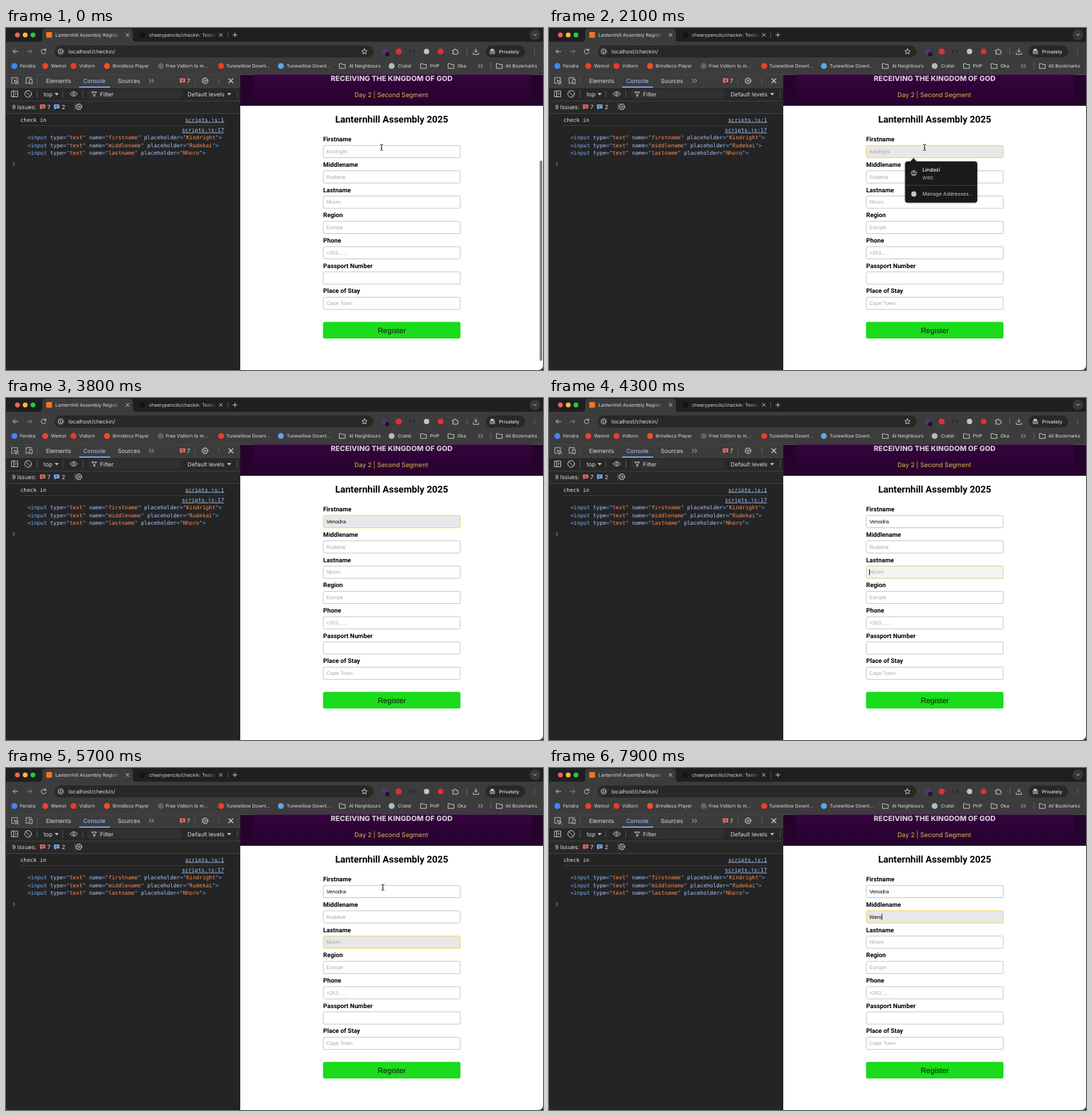
An HTML page for the animation above (8000 ms loop, 800 by 510 pixels).

```html
<!DOCTYPE html>
<html lang="en">
<head>
<meta charset="utf-8">
<title>Check-in form</title>
<style>
  html, body { margin: 0; width: 100%; height: 100%; overflow: hidden; background: #1e1f20; }
  svg { display: block; width: 800px; height: 510px; text-rendering: geometricPrecision; }
  text { white-space: pre; }
  .ui { font: 7px Inter, sans-serif; fill: #dedede; }
  .dev { font: 8.6px Inter, sans-serif; fill: #dcdcdc; }
  .dev .on { fill: #a8c7fa; }
  .mono { font: 8.03px "DejaVu Sans Mono", monospace; fill: #e3e3e3; }
  .mono .link { fill: #a8c7fa; text-decoration: underline; }
  .tag { fill: #7cacf8; }
  .key { fill: #a8c7fa; }
  .val { fill: #fe8d59; }
  .label { font: 700 9.3px Roboto, sans-serif; }
  .input { font: 7.8px "Liberation Sans", Arial, sans-serif; }
  .line { fill: none; stroke: #c7c7c7; stroke-width: 1; stroke-linecap: round; stroke-linejoin: round; }
  .mid { text-anchor: middle; }
  .popup { fill: #191a1b; }
  #address, #hint { filter: drop-shadow(0 .5px 1.5px #0006); }
</style>
</head>
<body>
<svg viewBox="0 0 800 510">
  <defs>
    <linearGradient id="fade" x1="0" x2="1">
      <stop offset="0" stop-color="#3c3c3c" stop-opacity="0"/>
      <stop offset="1" stop-color="#3c3c3c"/>
    </linearGradient>
    <linearGradient id="fadeDark" x1="0" x2="1">
      <stop offset="0" stop-color="#1e1f20" stop-opacity="0"/>
      <stop offset="1" stop-color="#1e1f20"/>
    </linearGradient>
    <linearGradient id="banner" x1="0" x2="0" y1="0" y2="1">
      <stop offset="0" stop-color="#36033f"/>
      <stop offset="1" stop-color="#27032e"/>
    </linearGradient>
    <clipPath id="view"><rect x="349" y="69.5" width="451" height="441"/></clipPath>
    <path id="cross" class="line" d="M-2.3-2.3 2.3 2.3M2.3-2.3-2.3 2.3"/>
    <path id="caretDown" fill="#c7c7c7" d="M-3-1.5H3L0 2z"/>
    <path id="dots" class="line" stroke-width="1.8" d="M0-3.3v0M0 0v0M0 3.3v0"/>
    <path id="more" class="line" d="M-3.5-2.5-1 0-3.5 2.5M.5-2.5 3 0 .5 2.5"/>
    <path id="folder" class="line" d="M-4-3.5H-1L0-2.3H4.3V3.5H-4z"/>
    <g id="gear" class="line">
      <circle r="3.8"/><circle r="1.4"/>
      <circle r="4.6" stroke-dasharray="1.8 1.81" stroke-linecap="butt"/>
    </g>
  </defs>

  <!-- tab strip -->
  <rect width="800" height="510" fill="#1e1f20"/>
  <path fill="#3c3c3c" d="M49 21q5 0 5-5V6q0-5 5-5H184q5 0 5 5V16q0 5 5 5z"/>
  <circle cx="17" cy="10.3" r="3.6" fill="#fe5f57"/>
  <circle cx="28.6" cy="10.3" r="3.6" fill="#febc2e"/>
  <circle cx="40.2" cy="10.3" r="3.6" fill="#28c840"/>
  <rect x="60" y="6" width="8.5" height="8.5" rx="1" fill="#f37623"/>
  <text class="ui" x="73.5" y="12.7">Lanternhill Assembly Registr</text>
  <rect x="155" y="4" width="18" height="12" fill="url(#fade)"/>
  <use href="#cross" x="181" y="10.3"/>
  <circle cx="203" cy="10.3" r="4.3" fill="#111519"/>
  <text class="ui" x="213" y="12.7">cheerypencils/checkin: Testin</text>
  <rect x="295" y="4" width="22" height="12" fill="url(#fadeDark)"/>
  <use href="#cross" x="320" y="10.3"/>
  <path class="line" d="M338 10.3h6M341 7.3v6"/>
  <path stroke="#555" d="M330.5 5.5v9"/>
  <circle cx="788" cy="10" r="8" fill="#363739"/>
  <path class="line" d="m785.7 9 2.3 2.2 2.3-2.2"/>

  <!-- address bar and bookmarks -->
  <rect y="20.5" width="800" height="49" fill="#3c3c3c"/>
  <path class="line" d="M17.5 35h-7m3-3-3 3 3 3"/>
  <path class="line" style="stroke:#858585" d="M31.5 35h7m-3-3 3 3-3 3"/>
  <path class="line" d="M59 33a3.5 3.5 0 1 0 .5 3M59.3 31v2.4h-2.4"/>
  <rect x="72.5" y="26" width="475" height="18" rx="9" fill="#282828"/>
  <circle cx="81.5" cy="35" r="6" fill="#3a3a3a"/>
  <g class="line"><circle cx="81.5" cy="35" r="3.5"/><path d="M81.5 34.8v1.8M81.5 33v0"/></g>
  <text class="ui" style="font-size:8px" x="93" y="37.8">localhost/checkin/</text>
  <path class="line" d="m534 31 1.2 2.6 2.8.3-2.1 1.9.6 2.8-2.5-1.4-2.5 1.4.6-2.8-2.1-1.9 2.8-.3z"/>
  <rect x="560" y="31" width="8" height="8" rx="2" fill="#56317c"/>
  <rect x="565" y="36" width="6" height="6" rx="1" fill="#241232"/>
  <circle cx="585" cy="35" r="4.6" fill="#df3032"/>
  <path class="line" style="stroke:#111" d="m602.5 33-2 2 2 2m5-4 2 2-2 2m-2-2v0"/>
  <circle cx="626.5" cy="35" r="4" fill="#bfc5c8"/>
  <circle cx="647.5" cy="35" r="4.3" fill="#e52f2f"/>
  <path class="line" d="M665.5 33h2.3a1.3 1.3 0 1 1 2.5 0h2.2v2.2a1.3 1.3 0 1 1 0 2.5V39h-7v-2a1.2 1.2 0 1 0 0-2.3z"/>
  <path stroke="#666" d="M686.5 30v10"/>
  <path class="line" d="M700 31v5m-2.3-2.2L700 36l2.3-2.2M696 37v2.3h8V37"/>
  <rect x="714.5" y="26" width="59" height="18" rx="9" fill="#282828"/>
  <path fill="#dedede" d="M722.4 31.2h4l1 2.6h-6zM720 34.5h9v.8h-9z"/>
  <g class="line"><circle cx="722.5" cy="37.3" r="1.4"/><circle cx="726.5" cy="37.3" r="1.4"/></g>
  <text class="ui" style="font-size:7.2px;font-weight:500" x="734.5" y="37.7">Privately</text>
  <use href="#dots" x="787.5" y="35"/>
  <g id="bookmarks"></g>
  <use href="#more" x="707" y="56.5"/>
  <path stroke="#666" d="M722.5 51.5v10"/>

  <!-- developer tools -->
  <rect y="69.5" width="349" height="441" fill="#242424"/>
  <rect y="69.5" width="349" height="19.5" fill="#3c3c3c"/>
  <rect y="89" width="349" height="38.5" fill="#282828"/>
  <path stroke="#494949" stroke-width=".8" d="M0 69.5H349M0 89H349M0 109H349M0 127.5H349"/>
  <g class="line">
    <path d="M17 78v-4H8.5v8.5h4" stroke-dasharray="1.5 1"/>
    <path d="m12.5 78 6 2.2-2.6 1-1 2.6zM16.5 81.5l2.5 2.5"/>
    <path d="M30 80v-6h8m-9 8h5M35.5 76.5h3.5v6.5h-3.5z"/>
    <path d="M8.5 94h9v8.5h-9zM11.5 94v8.5M13.7 96.7l2 1.5-2 1.5"/>
    <circle cx="33" cy="98.3" r="5"/><path d="m29.5 94.8 7 7"/>
    <path d="M95.5 98.3q5.5-7 11 0q-5.5 7-11 0z"/><circle cx="101" cy="98.3" r="1.6"/>
  </g>
  <path stroke="#555" d="M46.5 73.5v11M46.5 93v11M84.5 93v11M114.5 93v11M281.5 73.5v11M102.5 112v11M344.5 93v11"/>
  <rect x="121" y="91.3" width="141.5" height="14.5" rx="7.2" fill="#303030"/>
  <path class="line" d="M128 95.5h7l-2.7 3.3v3h-1.6v-3z"/>
  <g class="dev">
    <text x="59.8" y="81.8">Elements</text>
    <text x="115" y="81.8" class="on">Console</text>
    <text x="166.5" y="81.8">Sources</text>
    <text x="269.5" y="81.8">7</text>
    <text x="56" y="101.5">top</text>
    <text x="140" y="101.5">Filter</text>
    <text x="270.5" y="101.5">Default levels</text>
    <text x="9" y="120.7">9 Issues:</text>
    <text x="61.5" y="120.7">7</text>
    <text x="83" y="120.7">2</text>
  </g>
  <path fill="#7cacf8" d="M109 87.3h46V89h-46z"/>
  <path fill="#e46962" d="M259 75h8v6h-5l-2 2v-2h-1zM50.5 114h8v6h-5l-2 2v-2h-1z"/>
  <path fill="#7cacf8" d="M71.5 114h8v6h-5l-2 2v-2h-1z"/>
  <path stroke="#282828" stroke-width=".8" d="m261.8 76.5 2.5 3m0-3-2.5 3M53.3 115.5l2.5 3m0-3-2.5 3M73.5 116h4m-4 2h3"/>
  <use href="#more" x="217" y="78.7"/>
  <use href="#gear" x="296.5" y="78.7"/>
  <use href="#gear" x="108.5" y="117.5"/>
  <use href="#dots" x="317" y="78.7"/>
  <use href="#cross" transform="translate(335 78.7) scale(1.35)"/>
  <use href="#caretDown" x="75.5" y="98.5"/>
  <use href="#caretDown" x="332.5" y="98.5"/>
  <path stroke="#414141" d="M21.5 145.5H328" stroke-width=".8"/>
  <g class="mono">
    <text x="21.5" y="139.5">check in</text>
    <text x="267" y="139.5" class="link">scripts.js:1</text>
    <text x="262" y="155.2" class="link">scripts.js:17</text>
  </g>
  <g id="log"></g>
  <path class="line" style="stroke:#7cacf8" d="m10.5 200.7 2.5 2.5-2.5 2.5"/>

  <!-- web page -->
  <g clip-path="url(#view)">
    <rect x="349" y="69" width="451" height="442" fill="#fff"/>
    <rect x="349" y="69" width="451" height="47" fill="#25032c"/>
    <rect x="368" y="69" width="415" height="43" fill="url(#banner)"/>
    <text class="mid" style="font:800 10.7px Inter,sans-serif" x="574.5" y="78.6" fill="#d2cbd2">RECEIVING THE KINGDOM OF GOD</text>
    <text class="mid" style="font:9.4px Inter,sans-serif" x="574" y="103.3" fill="#dcbb55">Day 2 | Second Segment</text>
    <text class="mid" style="font:700 14px Roboto,sans-serif" x="574.6" y="140.5">Lanternhill Assembly 2025</text>
    <g id="form"></g>
    <rect x="472.3" y="438.3" width="204.7" height="24.7" rx="2.5" fill="#1adb1c"/>
    <text class="mid" style="font:11.3px 'Liberation Sans',Arial,sans-serif" x="574.7" y="454.5" fill="#0b180b">Register</text>
  </g>
  <rect id="scrollbar" x="795" y="197.5" width="4" height="299" rx="2" fill="#858585"/>
  <path fill="#3b2a28" d="M0 503q0 7 7 7H0z"/>
  <path fill="#222" d="M800 503q0 7-7 7h7z"/>

  <g id="address">
    <path class="popup" d="m537.5 200 5.5-6 5.5 6z"/>
    <rect class="popup" x="530.5" y="199" width="107.5" height="61.5" rx="4"/>
    <g class="line" stroke-width=".8">
      <circle cx="543.5" cy="216.3" r="3.7"/><circle cx="543.5" cy="215.3" r="1.2"/>
      <path d="M541.2 218.9q2.3-1.8 4.6 0"/>
    </g>
    <text class="ui" style="font-weight:600;font-size:7.6px" x="556.3" y="213.8">Lindazi</text>
    <text class="ui" style="fill:#b5b5b5" x="556.3" y="225.5">WRD</text>
    <path stroke="#3d3e40" d="M530.5 234.5H638"/>
    <circle cx="543.5" cy="247.5" r="3.9" fill="#c4c4c4"/>
    <text class="ui" style="fill:#c9c9c9;font-size:7.55px" x="556.3" y="250.3">Manage Addresses...</text>
  </g>
  <g id="hint">
    <path class="popup" d="m537.5 237 5.5-6 5.5 6z"/>
    <rect class="popup" x="530.5" y="236.3" width="91.5" height="26" rx="4"/>
    <text class="ui" style="font-size:7.6px;font-weight:500" x="537.7" y="252">Wevani</text>
  </g>
  <path id="pointer" fill="none" stroke="#222" d="M-2-4.5q2 0 2 1.5V3q0 1.5-2 1.5M2-4.5q-2 0-2 1.5V3q0 1.5 2 1.5M-1 1H1"/>
</svg>

<script>
  const $ = id => document.getElementById(id);

  const marks = [
    [8, "#4285f4", "Fendra", 21], [54, "#e94335", "Wemol", 67],
    [96, "#f03a2e", "Vidlorn", 109], [146, "#f25022", "Brindleco Player", 159],
    [226, "#5f6368", "Free Vidlorn to m...", 238], [316, "#e8402a", "Tunewillow Downl...", 328],
    [405, "#58a9e8", "Tunewillow Downl...", 418], [501, "", "AI Neighbours", 511],
    [570, "#b4b8bb", "Cratel", 584], [622, "", "PHP", 631.5], [663, "", "Oka", 672.5],
    [735, "", "All Bookmarks", 744]
  ];
  $("bookmarks").innerHTML = marks.map(([x, color, name, textX]) =>
    (color ? `<circle cx="${x + 4.5}" cy="56.7" r="4.4" fill="${color}"/>`
           : `<use href="#folder" x="${x}" y="56.7"/>`) +
    `<text class="ui" x="${textX}" y="59.3">${name}</text>`).join("");

  const attr = (key, value) =>
    ` <tspan class="key">${key}</tspan>="<tspan class="val">${value}</tspan>"`;
  const logged = [["firstname", "Kindright"], ["middlename", "Rudekai"], ["lastname", "Nhoro"]];
  $("log").innerHTML = logged.map(([name, hint], i) =>
    `<text class="mono tag" x="32" y="${165.7 + i * 11.8}">&lt;input` +
    attr("type", "text") + attr("name", name) + attr("placeholder", hint) + "&gt;</text>").join("");

  const labels = [["Firstname", "Kindright"], ["Middlename", "Rudekai"], ["Lastname", "Nhoro"],
    ["Region", "Europe"], ["Phone", "+263......"], ["Passport Number", ""], ["Place of Stay", "Cape Town"]];
  $("form").innerHTML = labels.map(([label, hint], i) =>
    `<g transform="translate(472.5 ${174.9 + i * 37.7})">
      <text class="label" y="-5.7">${label}</text>
      <rect x=".3" y=".3" width="204" height="18.3" rx="2"/>
      <text class="input" x="4.7" y="12">${hint}</text>
      <path stroke="#000" stroke-width=".9" d="M0 5v9"/>
    </g>`).join("");
  const fields = [...$("form").children].map((g, i) => ({
    box: g.children[1], text: g.children[2], caret: g.children[3],
    hint: labels[i][1], from: Infinity, to: Infinity, word: "", keys: []
  }));

  // focus spans and keystroke times, in ms
  Object.assign(fields[0], { from: 300, to: 3800, word: "Venodra", keys: [2300, 2500, 2700, 2900, 3200, 3400, 3600] });
  Object.assign(fields[1], { from: 6500, word: "Wero", keys: [7200, 7400, 7600, 7800] });
  Object.assign(fields[2], { from: 4100, to: 6500 });

  const clamp = v => Math.min(1, Math.max(0, v));
  const ramp = (t, start, length) => clamp((t - start) / length);
  const mix = (a, b, k) => `rgb(${a.map((v, i) => Math.round(v + (b[i] - v) * k))})`;
  const show = (el, on) => el.setAttribute("visibility", on ? "visible" : "hidden");

  function drawField(f, t) {
    const focus = ramp(t, f.from, 400) - ramp(t, f.to, 400);
    f.box.setAttribute("fill", mix([255, 255, 255], [232, 232, 232], focus));
    f.box.setAttribute("stroke", mix([196, 196, 196], [239, 211, 88], focus));

    const typed = f.keys.filter(k => k <= t);
    f.text.textContent = typed.length ? f.word.slice(0, typed.length) : f.hint;
    f.text.setAttribute("fill", typed.length ? "#000" : "#a9a9a9");

    const last = typed.length ? typed[typed.length - 1] : f.from;
    const on = t >= f.from && t < f.to && (t - last) % 1000 < 500;
    show(f.caret, on);
    if (on) {
      const end = typed.length ? f.text.getComputedTextLength() : 0;
      f.caret.setAttribute("transform", `translate(${5 + end} 0)`);
    }
  }

  function frame(now) {
    const t = Math.floor(now % 8000 / 100) * 100;
    fields.forEach(f => drawField(f, t));
    show($("address"), t >= 300 && t < 2300);
    show($("hint"), t >= 6500 && t < 7600);
    $("scrollbar").setAttribute("opacity", 1 - ramp(t, 200, 300));

    const move = ramp(t, 5800, 600);
    const ease = move * move * (3 - 2 * move);
    const x = (t < 5400 ? 559.5 : 561.5) + 9 * ease;
    $("pointer").setAttribute("transform", `translate(${x} ${178 + 49 * ease})`);
    show($("pointer"), t < 2300 || t >= 5400 && t < 7200);
    requestAnimationFrame(frame);
  }
  requestAnimationFrame(frame);
</script>
</body>
</html>
```
